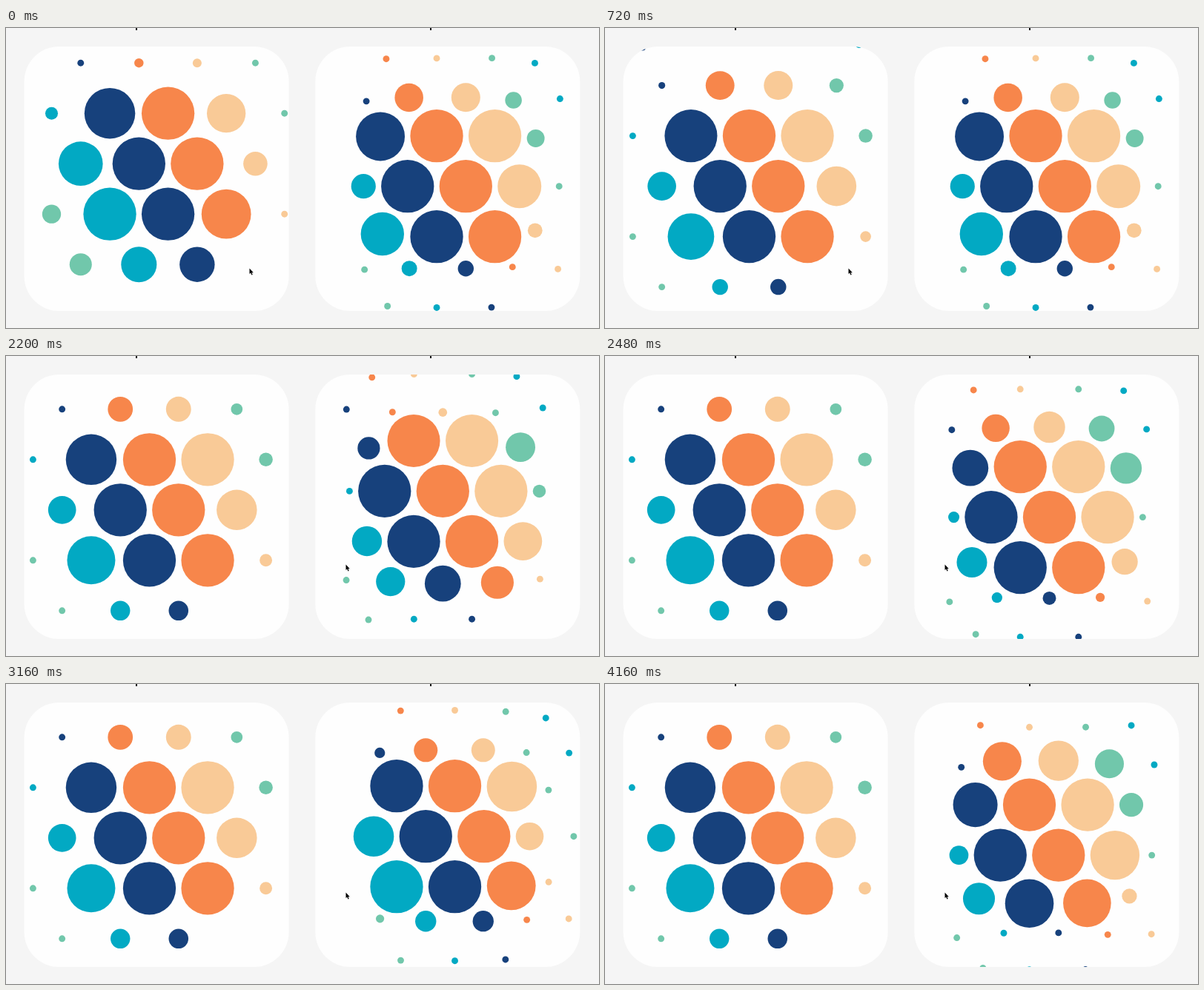
These frames come from a looping animation (800 by 405 pixels, 4.2 s). An HTML page with a canvas:

```html
<!DOCTYPE html>
<html lang="en">
<head>
<meta charset="utf-8">
<title>Bubble grids</title>
<style>
  html, body { margin: 0; width: 100%; height: 100%; overflow: hidden; background: #f5f5f5; }
  canvas { display: block; width: 800px; height: 405px; }
</style>
</head>
<body>
<canvas id="stage" width="800" height="405"></canvas>
<script>
const ctx = document.getElementById('stage').getContext('2d');
const LOOP = 4200, STEP = 40;
const COLORS = ['#f7864b', '#f9ca97', '#71c7ab', '#02a9c3', '#17417c'];
const BUBBLES = 30;

// Bubble field geometry
const SIZE = 71.3, MIN = 8.9, PITCH = 78.55, ROW = 68;
const RADIUS = 89, CORNER = 44.6, FRINGE = 71.4;
const PULL = 0.53, PULL_START = 108;
const PANEL = 357, PANEL_Y = 25, MID_Y = 203.6;

// Pointer and drag paths: a few stops of time, x, y
const leftDrag = [[0, 0, 0], [560, -15, 38], [720, -24.1, 30.4], [1000, -25.1, 24.6]];
const rightDrag = [
  [1680, 0, 0], [1720, 0, -5.8], [2200, -31, -31.3], [2760, -2.2, 36.8],
  [3160, 24.5, -8], [3520, 11, -25], [4160, -8.5, 17.4]
];
const pointer = [[840, 328.5, 324.5], [1120, 418, 308.5], [1400, 458.5, 281.5]];
const arrow = new Path2D('M0 0V7.6L1.7 6.1L2.9 9L4.2 8.4L3 5.7H5.3Z');

// Smooth curve through the stops, at rest at both ends
function along(stops, t) {
  const last = stops.length - 1;
  if (t <= stops[0][0]) return stops[0].slice(1);
  if (t >= stops[last][0]) return stops[last].slice(1);
  const i = stops.findIndex(s => s[0] > t) - 1;
  const a = stops[i], b = stops[i + 1], span = b[0] - a[0];
  const u = (t - a[0]) / span, v = 1 - u;
  const speed = (j, k) => j === 0 || j === last ? 0
    : (stops[j + 1][k] - stops[j - 1][k]) / (stops[j + 1][0] - stops[j - 1][0]);
  return [1, 2].map(k =>
    v * v * (1 + 2 * u) * a[k] + u * u * (1 + 2 * v) * b[k]
    + u * v * span * (v * speed(i, k) - u * speed(i + 1, k)));
}

function disc(x, y, r, color) {
  ctx.fillStyle = color;
  ctx.beginPath();
  ctx.arc(x, y, r, 0, Math.PI * 2);
  ctx.fill();
}

// Shrinks a bubble outside the rounded centre and pulls it inwards
function place(dx, dy, compact) {
  const ax = Math.abs(dx), ay = Math.abs(dy), inner = RADIUS - CORNER;
  const kx = ax - inner, ky = ay - inner;
  let edge, ux, uy;
  if (kx > 0 && ky > 0) {
    const dist = Math.hypot(kx, ky);
    edge = dist - CORNER;
    ux = kx / dist;
    uy = ky / dist;
  } else {
    edge = Math.max(ax, ay) - RADIUS;
    ux = ax > ay ? 1 : 0;
    uy = 1 - ux;
  }
  const shrink = (SIZE - MIN) / 2 * Math.min(1, Math.max(0, edge) / FRINGE);
  const shift = (compact ? shrink : 0) + PULL * Math.max(0, edge - PULL_START);
  return {
    x: dx - Math.sign(dx) * ux * shift,
    y: dy - Math.sign(dy) * uy * shift,
    r: SIZE / 2 - shrink
  };
}

// (x, y) is the centre of the fourth row; rows alternate 4 and 5 bubbles
function panel(left, x, y, compact) {
  const midX = left + PANEL / 2;
  ctx.save();
  ctx.beginPath();
  ctx.roundRect(left, PANEL_Y, PANEL, PANEL, 47);
  ctx.fillStyle = '#fefefe';
  ctx.fill();
  ctx.clip();
  for (let n = 0, row = 0; n < BUBBLES; row++) {
    const count = 4 + row % 2;
    for (let col = 0; col < count && n < BUBBLES; col++, n++) {
      const dx = x + (col - (count - 1) / 2) * PITCH - midX;
      const b = place(dx, y + (row - 3) * ROW - MID_Y, compact);
      disc(midX + b.x, MID_Y + b.y, b.r, COLORS[n % 5]);
    }
  }
  ctx.restore();
}

function cursor(x, y) {
  ctx.save();
  ctx.translate(x, y);
  ctx.strokeStyle = '#fff';
  ctx.stroke(arrow);
  ctx.fillStyle = '#000';
  ctx.fill(arrow);
  ctx.restore();
}

function draw(now) {
  const t = Math.floor(now % LOOP / STEP) * STEP;
  const [lx, ly] = along(leftDrag, t), [rx, ry] = along(rightDrag, t);
  ctx.fillStyle = '#f5f5f5';
  ctx.fillRect(0, 0, 800, 405);
  ctx.fillStyle = '#111';
  ctx.fillRect(175, 0, 2, 3);
  ctx.fillRect(572, 0, 2, 3);
  panel(24.6, 218.6 + lx, 115.2 + ly, false);
  panel(417.3, 620.3 + rx, 213.7 + ry, true);
  cursor(...along(pointer, t));
}

const begin = performance.now();
function tick() {
  draw(performance.now() - begin);
  requestAnimationFrame(tick);
}
tick();
</script>
</body>
</html>
```
